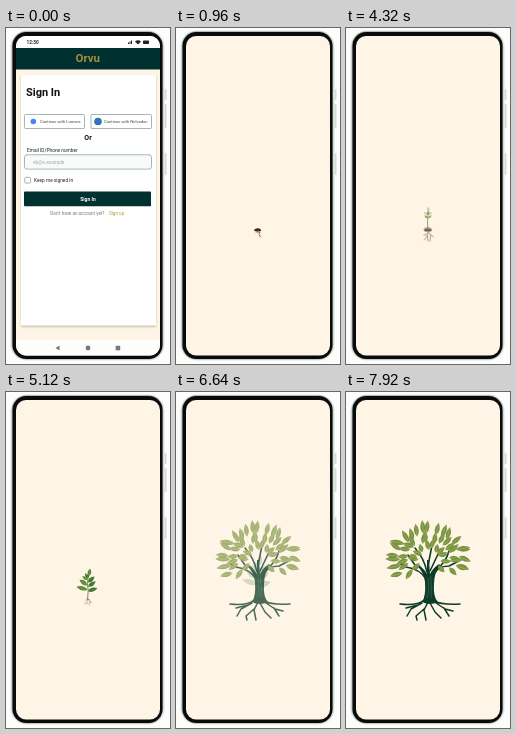
Write an HTML page that moves like this. It is 164 by 336 pixels and loops after 8 s.

```html
<!DOCTYPE html>
<html lang="en">
<head>
<meta charset="utf-8">
<title>Growing tree</title>
<style>
html, body { margin: 0; width: 100%; height: 100%; overflow: hidden; background: #fff; }
svg { display: block; width: 100vw; height: 100vh; font-family: Roboto, "Liberation Sans", sans-serif; }
.line { fill: none; stroke-linecap: round; stroke-linejoin: round; }
</style>
</head>
<body>
<svg viewBox="0 0 164 336">
  <defs>
    <clipPath id="screen"><rect x="10" y="8" width="144" height="319.5" rx="10"/></clipPath>
    <filter id="soft" x="-10%" y="-10%" width="120%" height="120%"><feGaussianBlur stdDeviation="1.3"/></filter>
  </defs>
  <rect width="164" height="336" fill="#fdfefc"/>
  <g fill="#d5dad5">
    <rect x="158.5" y="61" width="2" height="11" rx="1"/>
    <rect x="158.5" y="76" width="2" height="24" rx="1"/>
    <rect x="158.5" y="125" width="2" height="22" rx="1"/>
  </g>
  <rect x="4.5" y="2.5" width="154" height="330" rx="16" fill="#dfe5df"/>
  <rect x="5.6" y="3.3" width="151.6" height="328.3" rx="15" fill="#a6ada8"/>
  <rect x="6.5" y="4" width="150" height="327" rx="14" fill="#080b0a"/>
  <g clip-path="url(#screen)">
    <rect x="10" y="8" width="144" height="320" fill="#fef5e6"/>
    <g id="login">
      <rect x="10" y="8" width="144" height="12" fill="#fff"/>
      <text x="20.5" y="15.8" font-size="4.7" font-weight="600" fill="#222">12:30</text>
      <path d="M122 16v-1.5h1V16zm1.5 0v-2.5h1V16zm1.5 0v-3.5h1V16zM129 13.5q3-2.5 6 0l-3 3z" fill="#222"/>
      <rect x="137" y="12.5" width="6" height="3.5" rx=".8" fill="#222"/>
      <rect x="10" y="20" width="144" height="21.5" fill="#00302f"/>
      <text x="81.7" y="34.2" font-size="11.5" font-weight="700" text-anchor="middle" fill="#a58d3e">Orvu</text>
      <rect x="15" y="48" width="135" height="251" fill="#8b8370" opacity=".45" filter="url(#soft)"/>
      <rect x="15" y="47" width="135" height="250.5" fill="#fff"/>
      <text x="20" y="68" font-size="11" font-weight="600" fill="#111">Sign In</text>
      <g fill="#fff" stroke="#7f9896" stroke-width=".7">
        <rect x="18.5" y="86.5" width="60" height="14" rx="1"/>
        <rect x="85" y="86.5" width="60.5" height="14" rx="1"/>
        <rect x="18.5" y="126.8" width="127" height="14.3" rx="2.5" fill="#f8fbfa"/>
        <rect x="18.8" y="149.3" width="5.8" height="5.8" rx="1"/>
      </g>
      <circle cx="27.3" cy="93.5" r="2.8" fill="#4285f4"/>
      <circle cx="92" cy="93.5" r="3.8" fill="#3473b9"/>
      <g font-size="4.15" fill="#444">
        <text x="34" y="95">Continue with Lumvex</text>
        <text x="98" y="95">Continue with Nelvadun</text>
      </g>
      <text x="82" y="111.8" font-size="7" font-weight="700" text-anchor="middle" fill="#111">Or</text>
      <g font-size="4.8" fill="#222">
        <text x="21" y="123.5">Email ID/Phone number</text>
        <text x="27" y="135.6" fill="#a3aaa8">ab@x.example</text>
        <text x="28" y="153.8">Keep me signed in</text>
      </g>
      <rect x="18" y="163.5" width="127" height="14.8" rx="1" fill="#00302f"/>
      <text x="82" y="172.7" font-size="5" font-weight="600" text-anchor="middle" fill="#fff">Sign In</text>
      <text x="44.3" y="187.4" font-size="4.6" fill="#777">Don't have an account yet?</text>
      <text x="103" y="187.4" font-size="4.6" fill="#b99a35">Sign up</text>
      <rect x="10" y="312" width="144" height="16" fill="#fdfdfc"/>
      <g fill="#777">
        <path d="M49.5 320l4-2.5v5z"/>
        <circle cx="82" cy="320" r="2.4"/>
        <rect x="109.7" y="317.8" width="4.5" height="4.5"/>
      </g>
    </g>
    <g id="growth"></g>
  </g>
</svg>
<script>
const LOOP = 8000;
const login = document.getElementById('login');
const growth = document.getElementById('growth');

let seed = 17;
const random = () => (seed = (seed * 16807) % 2147483647) / 2147483647;
const jitter = size => (random() - 0.5) * size;
const clamp = v => Math.max(0, Math.min(1, v));
const easeOut = v => 1 - (1 - clamp(v)) ** 2;

const line = (d, color, width) =>
  `<path class="line" d="${d}" stroke="${color}" stroke-width="${width}"/>`;

const leaf = (x, y, angle, length, width, fill = '#4b7b32', vein = '#a6b673') =>
  `<g transform="translate(${x.toFixed(1)} ${y.toFixed(1)}) rotate(${angle.toFixed(0)})">
    <path d="M0 0Q${length * 0.4} ${-width} ${length} 0Q${length * 0.45} ${width} 0 0" ${fill ? `fill="${fill}"` : ''}/>
    ${line(`M0 0L${length * 0.85} 0`, vein, 0.3)}</g>`;

const soil = '<path d="M77.7 203Q79 200 82 200.5Q85 200.5 86 203Q82 204.5 77.7 203" fill="#33251a"/>';
const roots = (color, width) => line(
  'M82 203L81.5 208L78.5 212M81.8 206L78 207.5M82 204L84.5 207L84 213M84.5 207L87 209M81.5 208L82 213',
  color, width);

const seedling =
  '<path d="M78 202.8Q78.5 200 82 200.3Q85 200.5 85.2 203Q81 204 78 202.8" fill="#4b2420"/>' +
  line('M80 204H84L83 206.5L84.5 209', '#714c46', 0.8);

const rooted = soil + roots('#817468', 0.7);

const sprout = rooted + line('M82 201V196', '#49702d', 0.9) +
  leaf(82, 197, -120, 8, 3.4) + leaf(82, 197, -60, 8, 3.4, '#628b32');

const stalk = rooted + line('M82 202Q81 195 82 188', '#647d36', 0.8) +
  leaf(82, 190, -145, 4.5, 2.2) + leaf(82, 190, -35, 4.5, 2.2, '#70883d') +
  leaf(82, 187.5, -85, 5, 2.4, '#5d7d31');

const tallStalk = `<g transform="translate(82 213) scale(1.13) translate(-82 -213)">${stalk}</g>`;

function plant(leaves) {
  return roots('#b2a195', 0.65) + line('M81.5 204Q83.5 192 81 184Q82 176 83 170', '#587a38', 1.1) +
    line('M80 205L84 206M78 210L79 211M85 209L86 210', '#7c3e33', 0.8) +
    leaves.map((l, i) => leaf(...l, i % 2 ? '#3d742d' : '#5e8a3b')).join('');
}

const fullPlant = plant([
  [81.5, 192, -165, 16, 5.5], [82, 194, -18, 13.5, 5.5],
  [81, 186, -145, 13, 6], [82, 188, -36, 13, 5.5],
  [82, 178, -153, 9, 4.5], [82, 182, -42, 12, 5.5],
  [83, 174, -80, 11, 5], [83, 176, -130, 8, 4]
]);
const youngPlant =
  `<g transform="translate(82 213) scale(.73) translate(-82 -213)">${fullPlant}</g>`;

function crown() {
  const rings = [
    { count: 20, rx: 30, ry: 24, from: 152, to: 378, length: 14 },
    { count: 17, rx: 22, ry: 16, from: 150, to: 385, length: 12 },
    { count: 12, rx: 11, ry: 9, from: 150, to: 390, length: 10 }
  ];
  return rings.map(ring => Array.from({ length: ring.count }, (_, i) => {
    const angle = ring.from + (ring.to - ring.from) * i / (ring.count - 1) + jitter(7);
    const a = angle * Math.PI / 180;
    const x = 83 + Math.cos(a) * ring.rx + jitter(4);
    const y = 167 + Math.sin(a) * ring.ry + jitter(4);
    return leaf(x, y, angle + jitter(55), ring.length + jitter(3), 4.9, '', '#d1d2a0');
  }).join('')).join('');
}

const bark = '#0d3d2a';
const tree =
  `<path d="M76 210Q80 204 79 190Q78 180 71 174L73 173Q79 178 81 182L81 168H83L84 182Q87 176 93 172L95 174Q88 180 88 192Q87 205 92 210Q84 214 76 210" fill="${bark}"/>` +
  line('M80 187Q74 177 60 175L53 171M71 176L62 163M81 180Q78 166 69 156M82 174L86 153M86 184Q91 174 103 174L111 170M91 177Q100 170 103 159M84 179L94 158', bark, 1.6) +
  line('M78 208Q71 214 54 212M76 211L65 217L61 224M82 210L78 218L80 228M87 209Q96 213 114 212M90 211L99 217L107 219M84 211L89 220L95 226M72 213L60 216M78 217L70 224L71 228M98 216L103 224', bark, 1.5) +
  line('M81 206Q84 197 82 186M85 205Q86 194 84.5 184', '#53775a', 0.5) +
  `<g id="crown">${crown()}</g>`;

// Each stage dissolves in while the one before it dissolves out.
const stages = [
  { art: seedling, start: 959, end: 960 },
  { art: rooted, start: 1080, end: 1520 },
  { art: sprout, start: 2100, end: 2560 },
  { art: stalk, start: 3380, end: 3840 },
  { art: tallStalk, start: 4270, end: 4560 },
  { art: youngPlant, start: 4580, end: 5120 },
  { art: fullPlant, start: 5370, end: 6080 },
  { art: tree, start: 6250, end: 7040 }
];

growth.innerHTML = stages.map(s => `<g>${s.art}</g>`).join('');
const groups = [...growth.children];
const crownGroup = document.getElementById('crown');
const mix = (from, to, k) => `rgb(${from.map((v, i) => Math.round(v + (to[i] - v) * k))})`;

function draw(time) {
  const showLogin = time < 960;
  login.style.display = showLogin ? '' : 'none';
  growth.style.display = showLogin ? 'none' : '';
  const levels = stages.map(s => easeOut((time - s.start) / (s.end - s.start)));
  groups.forEach((group, i) => {
    const opacity = levels[i] * (1 - (levels[i + 1] || 0));
    group.setAttribute('opacity', opacity.toFixed(3));
  });
  crownGroup.setAttribute('fill', mix([135, 154, 75], [121, 147, 61], clamp((time - 7560) / 360)));
}

const begin = performance.now();
function frame() {
  draw((performance.now() - begin) % LOOP);
  requestAnimationFrame(frame);
}
frame();
</script>
</body>
</html>
```
